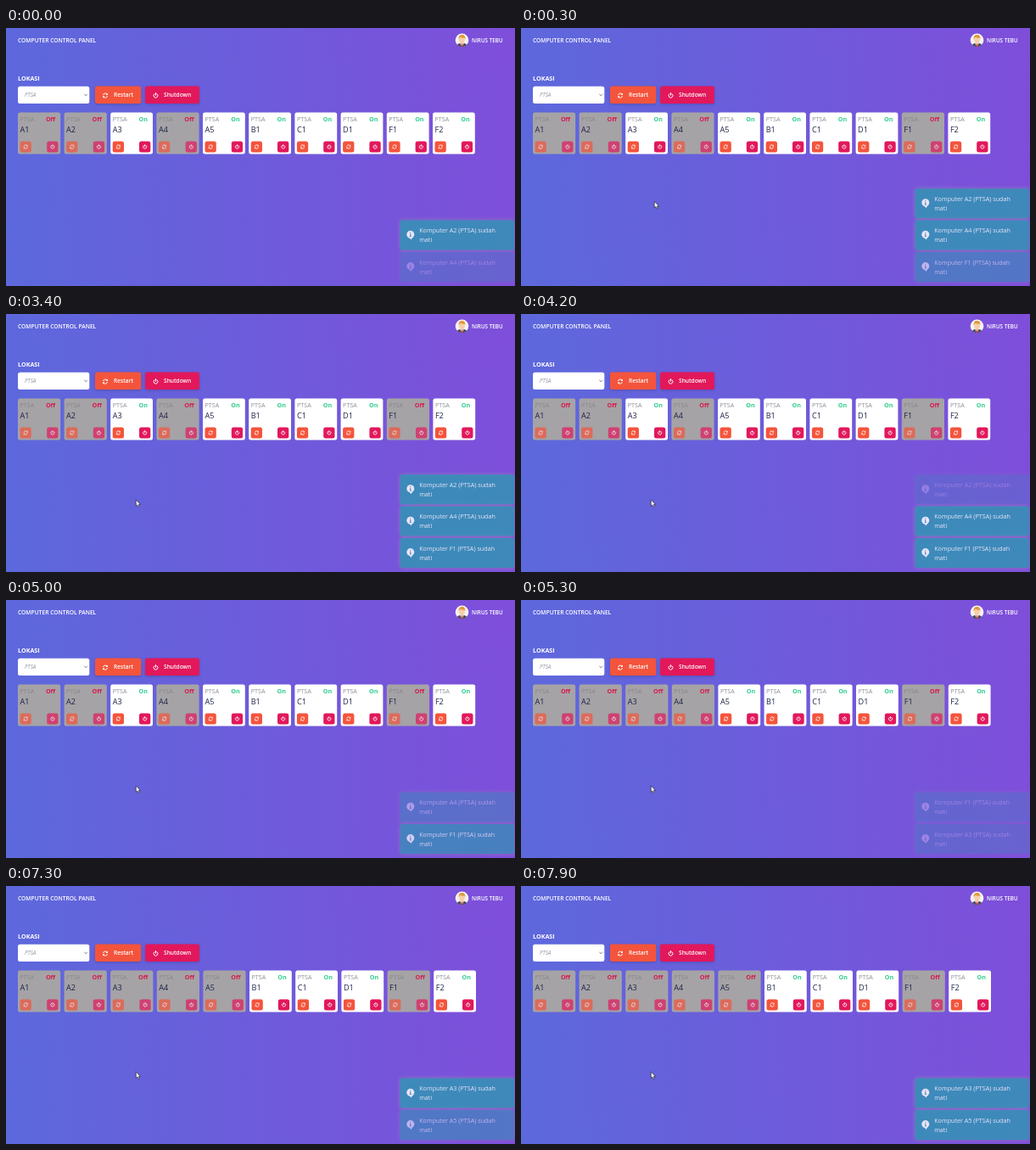
Write an HTML page that moves like this. It is 600 px wide and 304 px high and loops after 8000 ms.

```html
<!DOCTYPE html>
<html lang="id">
<head>
<meta charset="utf-8">
<title>Computer Control Panel</title>
<style>
  html, body { margin: 0; height: 100%; overflow: hidden; }
  body { background: linear-gradient(87deg, #5c69dc, #7f4eda); }
  svg { display: block; width: 100vw; height: 100vh; font-family: "Open Sans", sans-serif; }
  .toast rect { filter: drop-shadow(0 0 2.5px rgba(153, 140, 175, .8)); }
  .button { filter: drop-shadow(0 1px 1.5px rgba(40, 40, 90, .3)); }
</style>
</head>
<body>
<svg viewBox="0 0 600 304">
  <defs>
    <g id="sync" fill="none" stroke="#fff" stroke-width="1">
      <path d="M-2.5-.5A2.6 2.6 0 0 1 2-1.7M2.5.5A2.6 2.6 0 0 1-2 1.7"/>
      <path d="M2.9-3V-.6H.5ZM-2.9 3V.6H-.5Z" fill="#fff" stroke="none"/>
    </g>
    <g id="power" fill="none" stroke="#fff" stroke-width="1" stroke-linecap="round">
      <path d="M-1.5-2A2.5 2.5 0 1 0 1.5-2M0-3V-.3"/>
    </g>
    <clipPath id="portrait"><circle r="8"/></clipPath>
  </defs>
  <g id="page"></g>
  <g id="cards"></g>
  <g id="toasts"></g>
  <path id="cursor" d="M0 0V7.6L1.7 6.1 2.9 8.7 4.2 8.1 3.1 5.6H5.3Z"
        fill="#fff" stroke="#223" stroke-width=".7"/>
</svg>
<script>
const LOOP = 8000, STEP = 100, FADE_IN = 300;
const ORANGE = '#f4543c', CRIMSON = '#e2185b';
const NAMES = ['A1', 'A2', 'A3', 'A4', 'A5', 'B1', 'C1', 'D1', 'F1', 'F2'];

// Each machine goes off as its toast starts to appear.
const TOASTS = [
  { name: 'A2', start: -1500, hide: 3700, end: 4400 },
  { name: 'A4', start: -100, hide: 4700, end: 5300 },
  { name: 'F1', start: 100, hide: 4900, end: 5500 },
  { name: 'A3', start: 5200, hide: 9900, end: 10500 },
  { name: 'A5', start: 7100, hide: 11900, end: 12500 }
];

const byId = id => document.getElementById(id);
const clamp = v => Math.max(0, Math.min(1, v));
const text = (x, y, size, weight, fill, str, extra = '') =>
  `<text x="${x}" y="${y}" font-size="${size}" font-weight="${weight}" fill="${fill}" ${extra}>${str}</text>`;
const box = (x, y, w, h, fill, extra = '') =>
  `<rect x="${x}" y="${y}" width="${w}" height="${h}" rx="2.5" fill="${fill}" ${extra}/>`;
const icon = (id, x, y, scale = 1) =>
  `<use href="#${id}" transform="translate(${x} ${y}) scale(${scale})"/>`;

function avatar(x, y) {
  return `<g transform="translate(${x} ${y})" clip-path="url(#portrait)">
    <circle r="8" fill="#f5f3f3"/>
    <path d="M-6.5 8Q-6 3.6 0 3.3 6 3.6 6.5 8Z" fill="#4a4c5c"/>
    <path d="M-2.2 3.4H2.2L0 8Z" fill="#fff"/>
    <path d="M-.7 4H.7L.9 8H-.9Z" fill="#d8453f"/>
    <ellipse cy="-.6" rx="3.3" ry="4.2" fill="#f8cfa8"/>
    <path d="M-3.8-.5Q-4.6-6.4 0-6.3 4.6-6.4 3.8-.5L3-2.7Q0-2.5-2-3.6L-3-2.2Z" fill="#e0993d"/>
  </g>`;
}

function page() {
  return text(14, 17, 6.7, 600, '#fff', 'COMPUTER CONTROL PANEL')
    + avatar(537.5, 14.3)
    + text(549, 17, 6.3, 600, '#fff', 'NIRUS TEBU')
    + text(14, 62.3, 7.2, 700, '#fff', 'LOKASI')
    + box(14, 68.7, 84.3, 20.3, '#fff')
    + text(22, 81.3, 6.3, 400, '#9298a6', 'PTSA', 'font-style="italic"')
    + '<path d="M92.4 78l1.7 1.7 1.7-1.7" fill="none" stroke="#555" stroke-width=".8"/>'
    + box(105, 68.6, 54.3, 20.4, ORANGE, 'class="button"')
    + icon('sync', 117, 79.6)
    + text(127, 81.4, 6.6, 600, '#fff', 'Restart')
    + box(164, 68.6, 64, 20.4, CRIMSON, 'class="button"')
    + icon('power', 176.5, 79.6)
    + text(186, 81.4, 6.6, 600, '#fff', 'Shutdown');
}

function card(x, name, off) {
  const width = off ? 50.2 : 49.8, powerX = width - 16;
  return `<g transform="translate(${x} 0)">`
    + box(0, 99.4, width, 49, off ? '#a5a3a6' : '#fff')
    + text(2.5, 110.4, 7.2, 400, off ? '#88878c' : '#8d8f99', 'PTSA')
    + text(width - 6, 110.4, 7.2, 700, off ? '#d8174a' : '#2fce8c', off ? 'Off' : 'On', 'text-anchor="end"')
    + text(2.5, 122.7, 9.1, 500, '#1d2347', name)
    + `<g opacity="${off ? 0.7 : 1}">`
    + box(2.5, 133.4, 13.3, 13, ORANGE) + icon('sync', 9.2, 140, 0.85)
    + box(powerX, 133.4, 13.3, 13, CRIMSON) + icon('power', powerX + 6.7, 140, 0.85)
    + '</g></g>';
}

function cards(t) {
  let x = 14;
  return NAMES.map(name => {
    const off = name === 'A1' || TOASTS.some(toast => toast.name === name && t > toast.start);
    const markup = card(x, name, off);
    x += off ? 54.6 : 54.2;
    return markup;
  }).join('');
}

function toast({ name, start, hide, end }, y, t) {
  const opacity = 0.84 * clamp((t - start) / FADE_IN) * clamp((end - t) / (end - hide));
  return `<g class="toast" transform="translate(464.5 ${y})" opacity="${opacity}">`
    + box(0, 0, 134.5, 35, '#3295b5')
    + `<circle cx="12.3" cy="16.6" r="4.5" fill="#fff"/>
       <path d="M10 19.5L13.2 23 14.8 19.5Z" fill="#fff"/>
       <path d="M12.3 13.7v1M11.6 16h.7v2.8M11.4 18.9h1.8" fill="none" stroke="#3295b5"/>`
    + text(22.7, 14.6, 7.2, 400, '#fff', `Komputer ${name} (PTSA) sudah`)
    + text(22.7, 25.6, 7.2, 400, '#fff', 'mati')
    + '</g>';
}

function toasts(t) {
  const alive = TOASTS.filter(({ start, end }) => t > start && t < end);
  return alive.map((item, i) => toast(item, 264 - 37.4 * (alive.length - 1 - i), t)).join('');
}

function draw(now) {
  const t = Math.floor(now % LOOP / STEP) * STEP;
  byId('cards').innerHTML = cards(t);
  byId('toasts').innerHTML = toasts(t);
  // The pointer comes in from the top edge and then rests.
  const away = 1 - clamp(t / 400);
  byId('cursor').setAttribute('transform', `translate(${153.2 + 16 * away} ${218.8 - 232 * away * away})`);
}

byId('page').innerHTML = page();
const began = performance.now();
function tick() {
  draw(performance.now() - began);
  requestAnimationFrame(tick);
}
tick();
</script>
</body>
</html>
```
